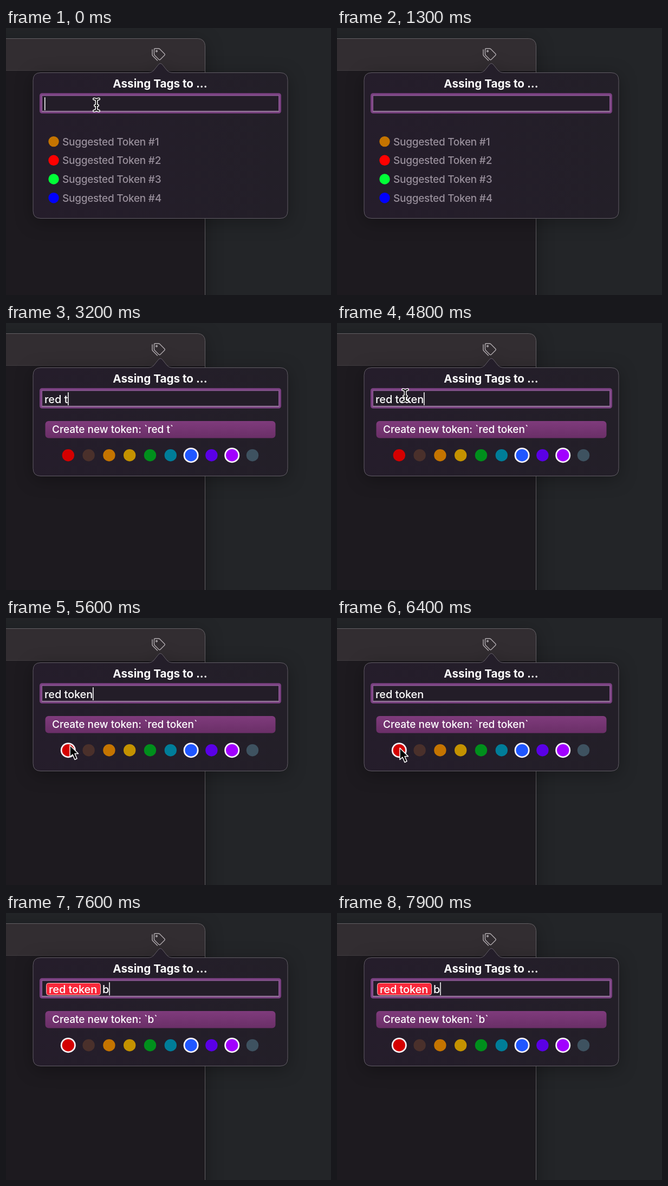
These frames come from a looping animation (600x493 px, 8000 ms). An HTML page:

```html
<!DOCTYPE html>
<html lang="en">
<head>
<meta charset="utf-8">
<title>Token field</title>
<style>
  html, body { margin: 0; width: 100%; height: 100%; overflow: hidden; background: #232528; }
  svg { display: block; width: 600px; height: 493px; }
  text { font: 500 19px Inter, sans-serif; fill: #fff; white-space: pre; }
  #title { font-weight: 700; font-size: 20.7px; }
  #typed, #tokenText { font-size: 20px; letter-spacing: -.1px; }
  #suggestions text { fill: #988f9b; letter-spacing: -.27px; }
</style>
</head>
<body>
<svg viewBox="0 0 600 493">
  <defs>
    <linearGradient id="rowFill" x2="0" y2="1">
      <stop stop-color="#7f3b7c"/><stop offset="1" stop-color="#6a2f67"/>
    </linearGradient>
    <linearGradient id="panelFill">
      <stop stop-color="#251d2b"/><stop offset="1" stop-color="#231f28"/>
    </linearGradient>
    <filter id="shadow" x="-30%" y="-30%" width="160%" height="160%" color-interpolation-filters="sRGB">
      <feDropShadow dx="0" dy="6" stdDeviation="16" flood-color="#000" flood-opacity=".3"/>
    </filter>
  </defs>

  <!-- window -->
  <rect x="-40" y="19.5" width="407.5" height="520" rx="13" fill="#1d1a1f" filter="url(#shadow)"/>
  <path d="M0 19.5H354.5Q367.5 19.5 367.5 32.5V79H0Z" fill="#322d31"/>
  <path d="M0 78.5H367.5" stroke="#403b3f"/>
  <rect x="-40" y="19.5" width="407.5" height="520" rx="13" fill="none" stroke="#636064"/>
  <g fill="none" stroke="#b4afb3" stroke-width="1.4" stroke-linejoin="round" stroke-linecap="round">
    <path d="M273.5 39.5Q273.5 38 275 38H281.5Q283 38 284 39L292.5 47.5Q294 49 292.5 50.5L285 58Q283.5 59.5 282 58L274.5 50.5Q273.5 49.5 273.5 48Z"/>
    <path d="M270 40V49Q270 50.5 271 51.5L279.5 60"/>
    <circle cx="278" cy="42.8" r="1.3"/>
  </g>

  <!-- popover -->
  <path id="panel" fill="url(#panelFill)" stroke="#625d66" filter="url(#shadow)"/>
  <text id="title" x="284.5" y="110" text-anchor="middle">Assing Tags to ...</text>
  <rect x="64.5" y="122.8" width="441" height="32.4" rx="2" fill="#231d28" stroke="#7a4081" stroke-width="5"/>
  <rect x="66.2" y="124.5" width="438" height="29.5" fill="none" stroke="#8f5d97" stroke-width="1.5"/>
  <path d="M66 154H504.5" stroke="#94819a" stroke-width="1.5"/>

  <g id="token">
    <rect x="74.5" y="129.5" width="100" height="22" rx="4" fill="#f8283a" stroke="#f7c5ca"/>
    <text id="tokenText" x="79" y="148">red token</text>
  </g>
  <text id="typed" y="148"></text>
  <rect id="caret" y="128" width="1.5" height="24" fill="#fff"/>

  <g id="suggestions"></g>
  <g id="create">
    <rect x="72.5" y="181" width="425" height="31.5" rx="6" fill="url(#rowFill)"/>
    <text id="createText" x="85" y="203"></text>
    <g id="swatches"></g>
  </g>

  <g id="beam" fill="none" stroke-linecap="round">
    <path id="beamShape" d="M-4.5-11Q0-11 0-7V7Q0 11-4.5 11M4.5-11Q0-11 0-7M0 7Q0 11 4.5 11M-2.5 1H2.5" stroke="#fff" stroke-width="5"/>
    <path id="beamCore" stroke="#111" stroke-width="2"/>
  </g>
  <path id="arrow" d="M0 0V21.5L5 17L9 26.5L13 24.5L9 15.5H15.5Z" fill="#000" stroke="#fff" stroke-width="1.5" stroke-linejoin="round"/>
</svg>

<script>
const LOOP = 8000, CLICK = 5600, COMMIT = 6600, SECOND = 7600;
const $ = id => document.getElementById(id);
const show = (id, on) => $(id).setAttribute('display', on ? 'inline' : 'none');
const place = (id, [x, y]) => $(id).setAttribute('transform', `translate(${x} ${y})`);

$('beamCore').setAttribute('d', $('beamShape').getAttribute('d'));

$('suggestions').innerHTML = ['#c47400', '#f00', '#00ff37', '#00f'].map((color, i) => {
  const y = 209.6 + i * 34.7;
  return `<circle cx="88" cy="${y}" r="9.7" fill="${color}"/>
    <text x="104" y="${y + 7}">Suggested Token #${i + 1}</text>`;
}).join('');

$('swatches').innerHTML = ['#d40000', '#4a302b', '#c47400', '#c49200', '#008f1c',
  '#007d99', '#1f56ff', '#5a00e6', '#a100ff', '#3e5260'].map((color, i) => {
  const at = `cx="${114.8 + i * 37.8}" cy="244.2"`;
  const ring = [0, 6, 8].includes(i) ? `<circle id="ring${i}" ${at} r="14" fill="#f6f2f7"/>` : '';
  return `${ring}<circle ${at} r="11.2" fill="${color}"/>`;
}).join('');

const keyTimes = [1500, 1800, 2100, 2800, 3000, 3400, 3800, 4100, 4500];
// intervals in which the insertion point is visible
const caretOn = [[0, 200], [700, 1200], [1500, 5000], [5500, 6000], [COMMIT, 7100], [SECOND, LOOP]];
// pointer path: time, x, y
const pointer = [[0, 167, 142], [4500, 167, 142], [4800, 126, 134],
  [5500, 118, 235], [5700, 118, 235], [6000, 116, 240], [LOOP, 116, 240]];

function pointerAt(t) {
  const i = pointer.findIndex(p => p[0] > t);
  const [t0, x0, y0] = pointer[i - 1], [t1, x1, y1] = pointer[i];
  const u = (t - t0) / (t1 - t0), k = u * u * (3 - 2 * u);
  return [x0 + (x1 - x0) * k, y0 + (y1 - y0) * k];
}

const panelPath = b => `M64 82.5H262Q269 82.5 273 78L281 68Q285 63 289 68L297 78Q301 82.5 308 82.5
  H506Q520 82.5 520 96.5V${b - 14}Q520 ${b} 506 ${b}H64Q50 ${b} 50 ${b - 14}V96.5Q50 82.5 64 82.5Z`;

function draw(t) {
  const committed = t >= COMMIT;
  const typed = committed ? (t >= SECOND ? 'b' : '')
    : 'red token'.slice(0, keyTimes.filter(k => k <= t).length);
  const left = committed ? 178 : 71;

  $('panel').setAttribute('d', panelPath(typed ? 282.5 : 351.5));
  show('suggestions', !typed);
  show('create', typed);
  show('token', committed);
  show('ring0', t >= CLICK);

  $('typed').textContent = typed;
  $('typed').setAttribute('x', left);
  $('createText').textContent = `Create new token: \`${typed}\``;
  $('caret').setAttribute('x', left + (typed ? $('typed').getComputedTextLength() : 0));
  show('caret', caretOn.some(([a, b]) => t >= a && t < b));

  const pos = pointerAt(t);
  const visible = t < 1000 || (t >= 4500 && !committed);
  const inField = pos[1] < 158;
  show('beam', visible && inField);
  show('arrow', visible && !inField);
  place('beam', pos);
  place('arrow', pos);
}

function tick() {
  draw(performance.now() % LOOP);
  requestAnimationFrame(tick);
}
tick();
</script>
</body>
</html>
```
